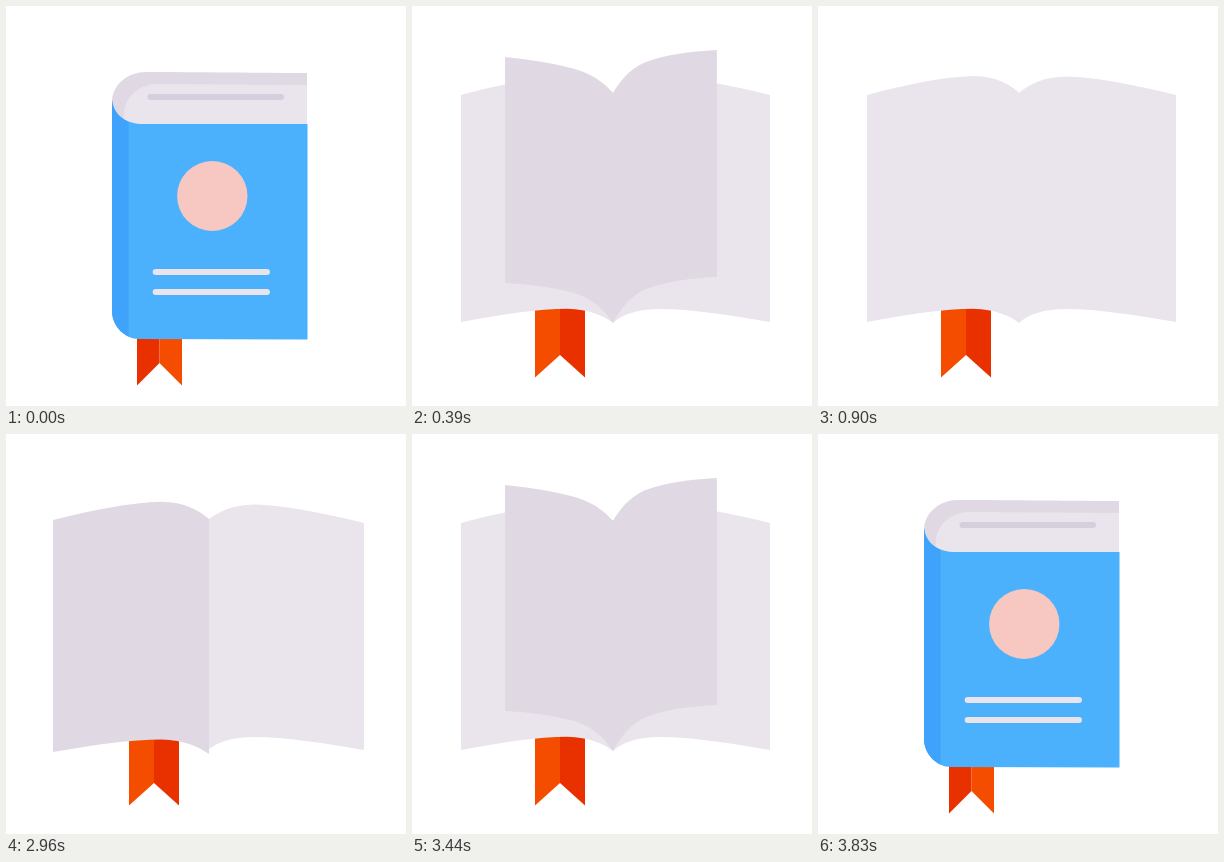
Recreate the animation shown at these times as an HTML page with a canvas. Size 400 by 400 pixels, loop 4860 ms.

```html
<!DOCTYPE html>
<html lang="en">
<head>
<meta charset="utf-8">
<title>Opening book</title>
<style>
  html, body { margin: 0; width: 100%; height: 100%; overflow: hidden; background: #fff; }
  canvas { display: block; width: 100vw; height: 100vh; }
</style>
</head>
<body>
<canvas id="stage" width="400" height="400"></canvas>
<script>
const ctx = document.getElementById('stage').getContext('2d');
const STEP = 30, LAST = 30, CLOSE_AT = 2960, LOOP = 4860;
const MID = 0.37; // opening progress at the middle pose
const COLOR = {
  page: '#eae5ec', shade: '#e0d9e3', rule: '#d6cedd',
  cover: '#4bb1fd', spine: '#3fa3fc', disc: '#f7c8c1', line: '#eae5ec',
  ribbonDark: '#e93100', ribbonLight: '#f54d00'
};

// Block outline from the fore-edge to the spine: x closed, half, open, then y likewise.
const BLOCK = [
  [301, 322, 358, 67, 72, 89],
  [260, 290, 317, 67, 70, 79],
  [190, 225, 279, 66, 68, 71],
  [140, 178, 248, 66, 67, 70.5],
  [122, 156, 226, 66, 67, 71],
  [107, 141, 211, 78, 80, 78],
  [106, 141, 201, 95, 100, 87]
];
const CLOSED_HEIGHT = [224, 226, 226, 227, 226, 214, 200];
const OPEN_HEIGHT = [227, 230, 232, 232.5, 232, 230, 230];

// Turning leaf: progress, spine x, top, bottom, edge x, top, bottom, top lift, bottom lift.
const POSES = [
  [0, 201, 87, 317, 358, 89, 316, 1, 0.8],
  [0.27, 201, 87, 317, 305, 44, 271, 1, 1.1],
  [0.5, 201, 87, 317, 204, 20, 247, 0, 0],
  [0.74, 201, 87, 317, 93, 51, 277, 0.65, 0.9],
  [1, 203, 85, 320, 47, 86, 318, 1, 0.8]
];
const LEAF_STARTS = [4.27, 9.81, 17.2], LEAF_TIME = 11.8;

// How far along the leaf each curve point sits, and how high it bulges.
const ALONG = [0, 0.066, 0.158, 0.303, 0.5, 0.73, 1];
const BULGE = [0, 9, 17, 17.5, 17, 10, 0];

const mix = (a, b, t) => a + (b - a) * t;

// Smooth blend through the closed, half-open and open values.
const blend = (a, b, c, p) =>
  a * (p - MID) * (p - 1) / MID +
  b * p * (1 - p) / (MID * (1 - MID)) +
  c * p * (p - MID) / (1 - MID);

function fill(color) {
  ctx.closePath();
  ctx.fillStyle = color;
  ctx.fill();
}

function polygon(color, ...points) {
  ctx.beginPath();
  points.forEach(([x, y]) => ctx.lineTo(x, y));
  fill(color);
}

function stroke(color, x1, y1, x2, y2, cap) {
  ctx.beginPath();
  ctx.moveTo(x1, y1);
  ctx.lineTo(x2, y2);
  ctx.lineWidth = 6;
  ctx.lineCap = cap;
  ctx.strokeStyle = color;
  ctx.stroke();
}

function curve(points) {
  for (let i = 1; i < points.length; i += 3) {
    ctx.bezierCurveTo(...points[i], ...points[i + 1], ...points[i + 2]);
  }
}

// Fills between two curves of seven points each.
function sheet(color, top, bottom) {
  ctx.beginPath();
  ctx.moveTo(...top[0]);
  curve(top);
  const back = [...bottom].reverse();
  ctx.lineTo(...back[0]);
  curve(back);
  fill(color);
}

function leaf(color, [sx, top, bottom, ex, edgeTop, edgeBottom, lift, lowLift]) {
  const side = (from, to, amount) =>
    ALONG.map((a, i) => [mix(sx, ex, a), mix(from, to, a) - BULGE[i] * amount]);
  sheet(color, side(top, edgeTop, lift), side(bottom, edgeBottom, lowLift));
}

function turningLeaf(u, shift) {
  const i = Math.max(1, POSES.findIndex(pose => u <= pose[0]));
  const a = POSES[i - 1], b = POSES[i];
  const t = (u - a[0]) / (b[0] - a[0]);
  const pose = a.map((v, k) => mix(v, b[k], t)).slice(1);
  pose[0] += shift;
  pose[3] += shift;
  leaf(COLOR.shade, pose);
}

function ribbon(p) {
  const a = blend(131, 154, 173, p), b = blend(176, 176, 123, p);
  const m = (a + b) / 2;
  const tip = blend(379.5, 378, 371.5, p), notch = blend(357, 355, 349, p);
  polygon(COLOR.ribbonDark, [a, 292], [m, 292], [m, notch], [a, tip]);
  polygon(COLOR.ribbonLight, [b, 292], [m, 292], [m, notch], [b, tip]);
}

function block(p) {
  const outer = BLOCK.map(([a, b, c, d, e, f]) => [blend(a, b, c, p), blend(d, e, f, p)]);
  const low = outer.map(([x, y], i) => [x, y + mix(CLOSED_HEIGHT[i], OPEN_HEIGHT[i], p)]);
  const inset = blend(12, 11, 0, p);
  const inner = outer.map(([x, y], i) => [x + (i > 2 ? inset : 0), y + inset]);
  if (p < 1) sheet(COLOR.shade, outer, low);
  sheet(COLOR.page, inner, low);
  return { top: outer[6][1], bottom: low[6][1] };
}

function coverPath(x, ex, top, bottom, p) {
  const r = Math.min(32, 0.6 * (ex - x));
  const shoulder = top - 5 * p, foot = 333 + 11 * p;
  ctx.beginPath();
  ctx.moveTo(x, 94 + 20 * p);
  ctx.bezierCurveTo(x + 2, 110 + 20 * p, x + 0.45 * r, shoulder, x + r, shoulder);
  ctx.lineTo(ex, top);
  ctx.lineTo(ex, bottom);
  ctx.lineTo(x + 0.85 * r, foot);
  ctx.bezierCurveTo(x + 0.4 * r, foot - 3 * p, x, 320 + 24 * p, x, 305 + 33 * p);
  ctx.closePath();
}

function cover(x, ex, top, bottom, p) {
  const w = ex - x, s = p / MID;
  const at = (closed, half) => x + w * mix(closed, half, s);
  coverPath(x, ex, top, bottom, p);
  ctx.fillStyle = COLOR.cover;
  ctx.fill();
  ctx.save();
  ctx.clip();
  ctx.fillStyle = COLOR.spine;
  ctx.fillRect(x, 80, Math.min(16.5, 0.26 * w), 290);
  ctx.restore();

  ctx.beginPath();
  ctx.ellipse(at(0.513, 0.41), 190 - 3 * s, w * mix(0.18, 0.131, s), 35 + s, -0.03 * s, 0, Math.PI * 2);
  fill(COLOR.disc);
  for (const y of [266, 286]) {
    const inset = p ? 0 : 3;
    stroke(COLOR.line, at(0.208, 0.185) + inset, y - 12 * s, at(0.808, 0.63) - inset, y + 5 * s,
      p ? 'butt' : 'round');
  }
}

function draw(n) {
  const p = Math.sin(Math.PI / 2 * Math.min(1, n / 12)) ** 2;
  const x = blend(106, 141, 201, p), ex = blend(301.5, 206, 49, p);
  const edgeTop = blend(118, 128, 89, p), edgeBottom = blend(333.5, 350, 316, p);

  ctx.fillStyle = '#fff';
  ctx.fillRect(0, 0, 400, 400);
  ribbon(p);
  const spine = block(p);

  if (p < 0.2) {
    ctx.globalAlpha = 1 - p * 5;
    stroke(COLOR.rule, 144.5 + 95 * p, 91, 275 + 57 * p, 91, 'round');
    ctx.globalAlpha = 1;
  }
  if (ex > x) cover(x, ex, edgeTop, edgeBottom, p);
  else leaf(COLOR.page, [x + 0.5, spine.top, spine.bottom, ex, edgeTop, edgeBottom, 1, 0.8]);

  if (n < 7 || n >= LAST) return;
  for (const start of LEAF_STARTS) {
    const u = (n - start) / LEAF_TIME;
    if (u > 0 && u < 1.001) turningLeaf(Math.min(1, u), x - 201);
  }
}

// The book opens, rests, then closes along the same steps in reverse.
function stepAt(t) {
  if (t < CLOSE_AT) return Math.min(LAST, Math.floor(t / STEP));
  return Math.max(0, LAST - 1 - Math.floor((t - CLOSE_AT) / STEP));
}

const begin = performance.now();
function tick() {
  draw(stepAt((performance.now() - begin) % LOOP));
  requestAnimationFrame(tick);
}
tick();
</script>
</body>
</html>
```
